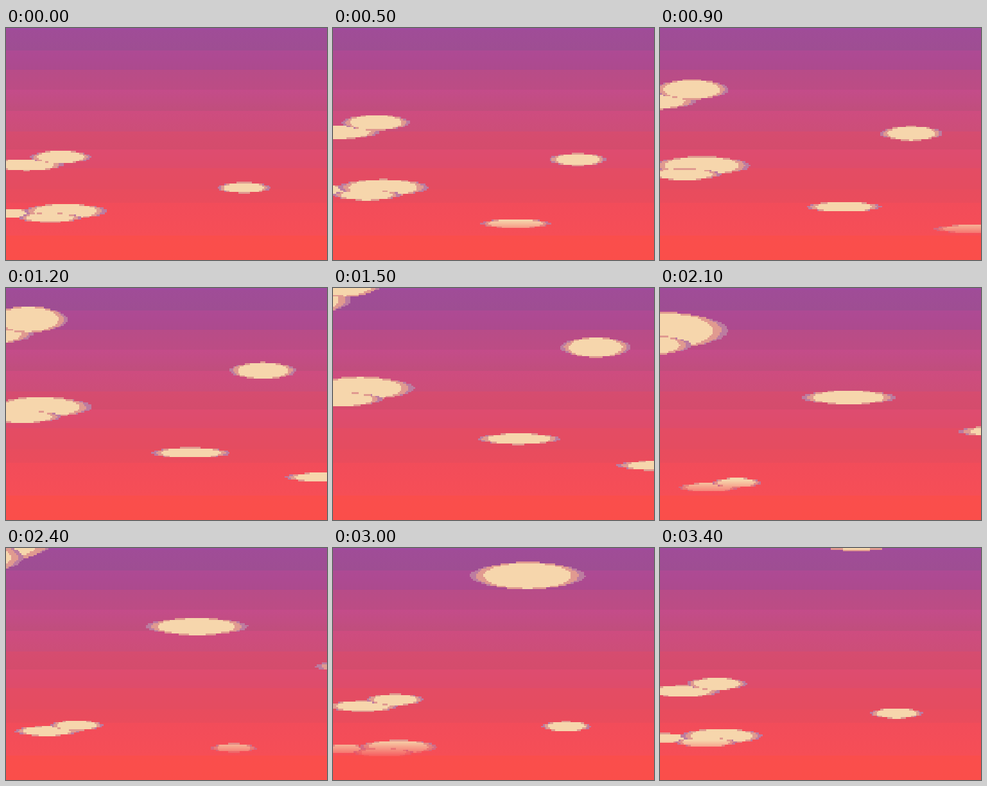
An HTML page with a canvas for the animation above (3500 ms loop, 500 px wide and 361 px high).

```html
<!DOCTYPE html>
<html lang="en">
<head>
<meta charset="utf-8">
<title>Sunset clouds</title>
<style>
html, body { margin: 0; width: 100%; height: 100%; overflow: hidden; background: #e44c62; }
canvas { display: block; width: 500px; height: 361px; }
</style>
</head>
<body>
<canvas id="stage" width="500" height="361"></canvas>
<script>
const W = 500, H = 361, LOOP = 3500, STEP = 100;
const CELL = 500 / 188;
const PERIOD = 34.35; // flight distance covered in one loop
const VANISH = { x: 256, y: 710 };
const ctx = document.getElementById('stage').getContext('2d');

function makeLayer() {
  const c = document.createElement('canvas');
  c.width = W;
  c.height = H;
  return c.getContext('2d');
}

// Sky bands: top edge, colour at the top, colour at the bottom
const bands = [
  [0, '#a04c98', '#9e4e92'],
  [35, '#ae4a94', '#ac4a8e'],
  [65, '#b84c88', '#bc4c84'],
  [96, '#c44c8a', '#c04e7c'],
  [129, '#ce4c80', '#cc4e78'],
  [161, '#d64c70', '#d44c6c'],
  [189, '#de4c70', '#de4c6a'],
  [218, '#e44c64', '#e44c60'],
  [251, '#e84c5e', '#ea4c5c'],
  [272, '#f24c5a', '#f64e56'],
  [323, '#fa4e4c', '#fa4e4a'],
  [H]
];

function paintSky(g) {
  for (let i = 0; i < bands.length - 1; i++) {
    const [top, a, b] = bands[i], end = bands[i + 1][0];
    const fill = g.createLinearGradient(0, top, 0, end);
    fill.addColorStop(0, a);
    fill.addColorStop(1, b);
    g.fillStyle = fill;
    g.fillRect(0, top, W, end - top);
  }
  g.fillStyle = '#a04ca2';
  g.fillRect(0, 0, W, 3);
}

// depth: distance at the loop start; x, r: side offset and half width; tall: height factor
const puffs = [
  { depth: 75.9, x: 0.587, r: 0.158, tall: 1 },
  { depth: 70.55, x: 0.0705, r: 0.135, tall: 1 },
  { depth: 57.65, x: 0.248, r: 0.089, tall: 1 },
  { depth: 63.1, x: -0.6, r: 0.1, tall: 1 },
  { depth: 62.6, x: -0.385, r: 0.152, tall: 1.55 },
  { depth: 64.1, x: -0.452, r: 0.118, tall: 1 },
  { depth: 53.5, x: -0.452, r: 0.118, tall: 1 },
  { depth: 52.25, x: -0.336, r: 0.094, tall: 1 }
];

// Fringe, rim and core of every puff: colour, width factor, height factor
const rings = [
  ['#bc7ca0', 1, 0.93],
  ['#e09a90', 0.89, 1],
  ['#f6d6ac', 0.76, 0.93]
];

// Flight is uneven: time in ms, distance flown
const pace = [[0, 0], [500, 5], [1200, 11.9], [1800, 17.25], [2400, 25.3],
  [3000, 30.5], [3400, 33.25], [LOOP, PERIOD]];

function flown(t) {
  let i = 1;
  while (t > pace[i][0]) i++;
  const [t0, d0] = pace[i - 1], [t1, d1] = pace[i];
  return d0 + (d1 - d0) * (t - t0) / (t1 - t0);
}

const snap = v => Math.round(Math.round(v / CELL) * CELL);

function pixelEllipse(g, cx, cy, rx, ry) {
  const last = Math.min(Math.ceil(H / CELL), Math.ceil((cy + ry) / CELL));
  for (let row = Math.max(0, Math.floor((cy - ry) / CELL)); row < last; row++) {
    const d = ((row + 0.5) * CELL - cy) / ry;
    if (Math.abs(d) >= 1) continue;
    const half = rx * Math.sqrt(1 - d * d);
    const left = snap(cx - half), top = Math.round(row * CELL);
    g.fillRect(left, top, snap(cx + half) - left, Math.round((row + 1) * CELL) - top);
  }
}

function drawPuff(g, puff, z) {
  const s = 26600 / z;
  const lift = Math.max(0, s - 640);
  const x = VANISH.x + puff.x * s;
  const y = VANISH.y - s - 0.0047 * lift * lift;
  const ry = 2794 / (797 - s) * puff.tall;
  for (const [color, kx, ky] of rings) {
    g.fillStyle = color;
    pixelEllipse(g, x, y, puff.r * s * kx, ry * ky);
  }
}

const sky = makeLayer();
const clouds = makeLayer();
paintSky(sky);

const haze = clouds.createLinearGradient(0, 299, 0, 327);
haze.addColorStop(0, '#000');
haze.addColorStop(1, 'rgba(0,0,0,0)');

function draw(t) {
  const dist = flown(t);
  clouds.globalCompositeOperation = 'source-over';
  clouds.clearRect(0, 0, W, H);
  for (const puff of puffs) {
    let z = puff.depth - dist;
    while (z < 35) z += PERIOD;
    while (z - PERIOD >= 35) z -= PERIOD;
    if (z + PERIOD < 75) drawPuff(clouds, puff, z + PERIOD);
    drawPuff(clouds, puff, z);
  }
  clouds.globalCompositeOperation = 'destination-in';
  clouds.fillStyle = haze;
  clouds.fillRect(0, 0, W, H);
  ctx.drawImage(sky.canvas, 0, 0);
  ctx.drawImage(clouds.canvas, 0, 0);
}

const start = performance.now();
function tick() {
  const t = (performance.now() - start) % LOOP;
  draw(Math.floor(t / STEP) * STEP);
  requestAnimationFrame(tick);
}
tick();
</script>
</body>
</html>
```
